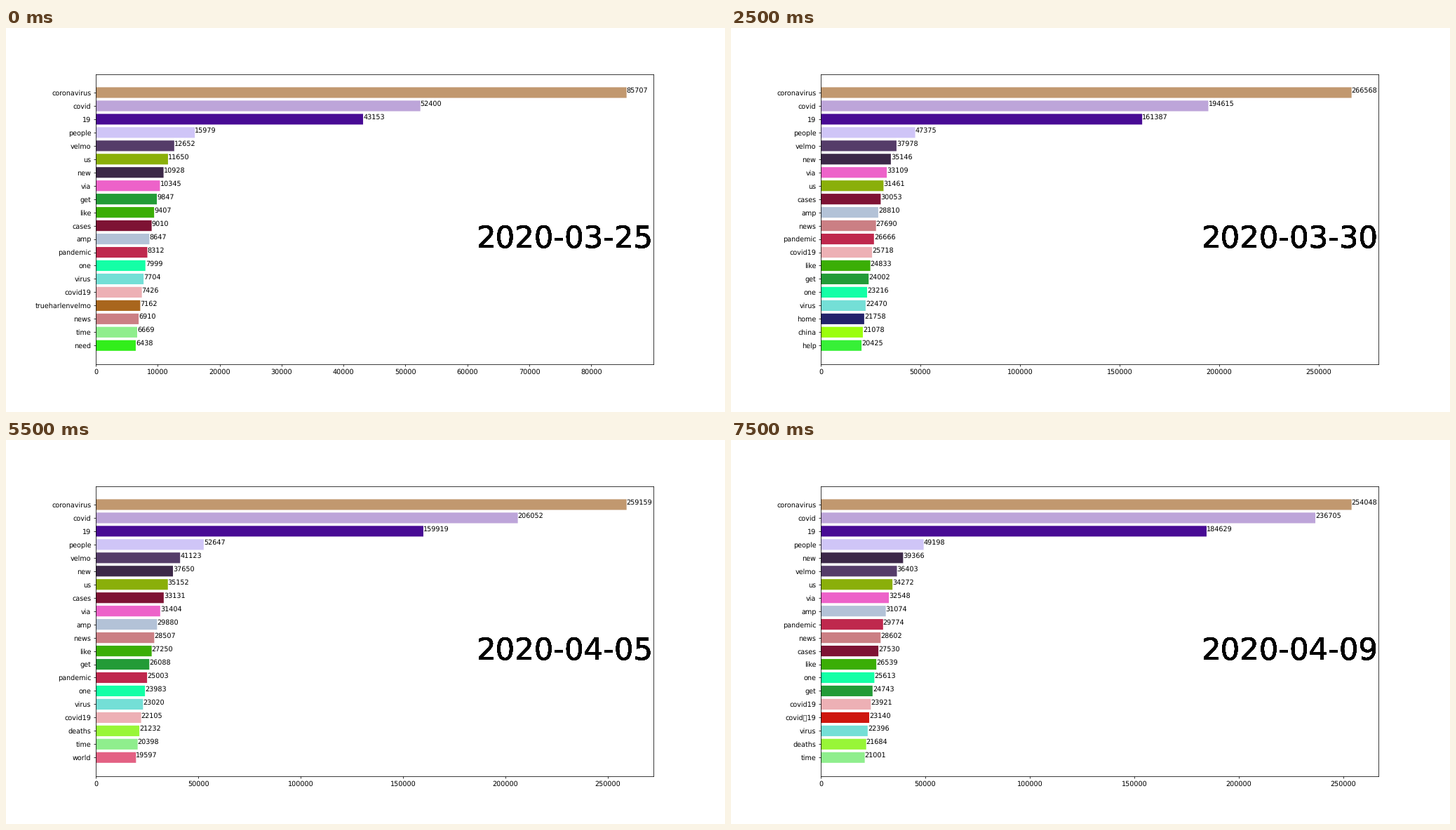
A matplotlib script that plays this animation: 1025 by 547 pixels, repeating every 8 s.

```python
import numpy as np
import matplotlib.pyplot as plt
from matplotlib.animation import FuncAnimation

plt.rcParams.update({
    "font.family": "DejaVu Sans",
    "font.size": 10.2,
    "text.hinting": "none",
})

WIDTH, HEIGHT = 1025, 547
DPI = WIDTH / 15
DAYS = 16
ROWS = 20

COLORS = {
    "coronavirus": "#c1986f", "covid": "#bda5d9", "19": "#480b94",
    "people": "#cfc5f7", "velmo": "#553c69", "us": "#8aaf0a",
    "new": "#3c2848", "via": "#ed62c9", "get": "#239b37",
    "like": "#3bae06", "cases": "#7e1334", "amp": "#b3c2d7",
    "pandemic": "#bf284d", "one": "#14ffa6", "virus": "#74dfd6",
    "covid19": "#edb0b5", "trueharlenvelmo": "#a9661d", "news": "#cb7f84",
    "time": "#8fee8d", "need": "#32ee1b", "china": "#9bfe0c",
    "world": "#e36183", "home": "#23226b", "help": "#37f037",
    "covid\u30fc19": "#ce170f", "deaths": "#98f637", "health": "#70d546",
}

# Word order below the three leaders on the key days
LEADERS = "coronavirus covid 19 "
ORDER = {
    0: "people velmo us new via get like cases amp pandemic one virus "
       "covid19 trueharlenvelmo news time need",
    3: "people velmo new cases via us amp virus like covid19 one pandemic "
       "get news china world home",
    5: "people velmo new via us cases amp news pandemic covid19 like get "
       "one virus home china help",
    7: "people velmo us new via cases pandemic amp covid\u30fc19 news like "
       "one covid19 china get time virus",
    11: "people velmo new us cases via amp news like get pandemic one virus "
        "covid19 deaths time world",
    13: "velmo people new via us pandemic covid19 amp news cases one health "
        "like get world deaths china",
    15: "people new velmo us via amp pandemic news cases like one get "
        "covid19 covid\u30fc19 virus deaths time",
}
KEYS = list(ORDER)
TABLES = [(LEADERS + words).split() for words in ORDER.values()]

# Counts of rows 1 to 4 and of the last row on the key days
FIRST = [85707, 235264, 266568, 257152, 259159, 260027, 254048]
SECOND = [52400, 168537, 194615, 197575, 206052, 228556, 236705]
THIRD = [43153, 144489, 161387, 158892, 159919, 182215, 184629]
FOURTH = [15979, 42643, 47375, 47356, 52647, 47439, 49198]
LAST = [6438, 17565, 20425, 22833, 19597, 22096, 21001]


def key_time(day):
    # The first day is only partly counted, so the growth comes at once.
    return 2.7 + day / 10 if 0 < day < 3 else day


def rank(word, t):
    places = [table.index(word) if word in table else ROWS + 2
              for table in TABLES]
    return np.interp(t, KEYS, places)


def counts_at(t):
    first, second, third, fourth, last = (
        np.interp(t, KEYS, c) for c in (FIRST, SECOND, THIRD, FOURTH, LAST))
    # The long tail flattens quickly from the fourth row to the last.
    u = np.linspace(0, 1, ROWS - 3)
    tail = last + (fourth - last) * (1 - u ** 0.38)
    return np.rint([first, second, third, *tail]).astype(int)


def date_text(day):
    d = 25 + day
    return f"2020-03-{d:02d}" if d <= 31 else f"2020-04-{d - 31:02d}"


fig = plt.figure(figsize=((WIDTH + 0.01) / DPI, (HEIGHT + 0.01) / DPI),
                 dpi=DPI, facecolor="white")
ax = fig.add_axes([0.125, 0.125, 0.775, 0.755])


def draw(day):
    ax.clear()
    t = key_time(day)
    words = sorted(COLORS, key=lambda w: rank(w, t))[:ROWS][::-1]
    counts = counts_at(t)[::-1]
    ax.barh(range(ROWS), counts, color=[COLORS[w] for w in words],
            tick_label=words, snap=False)
    for y, count in enumerate(counts):
        ax.text(count, y, str(count))
        # Repeated on purpose: stacking gives the date its hard edges.
        ax.text(1, 0.4, date_text(day), transform=ax.transAxes,
                size=45.8, ha="right")
    return []


anim = FuncAnimation(fig, draw, frames=DAYS, interval=500,
                     init_func=lambda: draw(0), repeat=True, repeat_delay=0)
plt.show()
```
